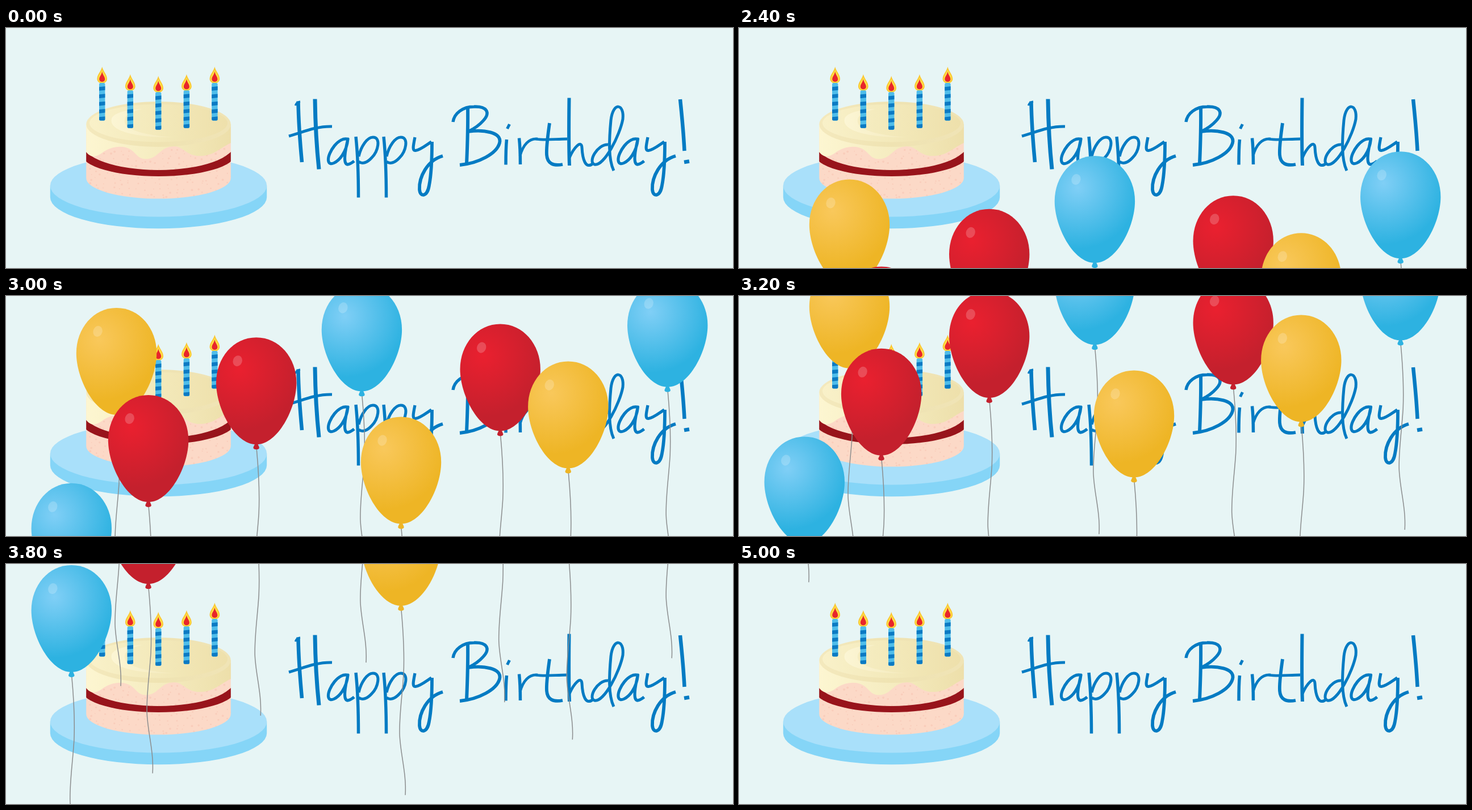
Write an HTML page with a canvas that moves like this. It is 1280x424 px and loops after 5100 ms.

```html
<!DOCTYPE html>
<html lang="en">
<head>
<meta charset="utf-8">
<title>Happy Birthday!</title>
<style>
  html, body { margin: 0; width: 100%; height: 100%; overflow: hidden; background: #e7f5f5; }
  canvas { display: block; }
</style>
</head>
<body>
<canvas id="stage" width="1280" height="424" aria-label="Happy Birthday!"></canvas>
<script>
const ctx = document.getElementById('stage').getContext('2d');
const LOOP = 5100, STEP = 100, RISE = 41.1;
const TAU = Math.PI * 2;

function fill(path, color, c = ctx) {
  c.fillStyle = color;
  c.fill(path);
}

function ellipse(x, y, rx, ry, angle = 0) {
  const p = new Path2D();
  p.ellipse(x, y, rx, ry, angle, 0, TAU);
  return p;
}

function horizontal(c, x0, x1, ...colors) {
  const g = c.createLinearGradient(x0, 0, x1, 0);
  colors.forEach((color, i) => g.addColorStop(i / (colors.length - 1), color));
  return g;
}

function random(seed) {
  return () => (seed = (seed * 16807) % 2147483647) / 2147483647;
}

// Upright band whose lower and upper edges follow the front of an ellipse.
function frontBand(cx, rx, topY, topRy, bottomY, bottomRy) {
  const p = new Path2D();
  p.ellipse(cx, topY, rx, topRy, 0, Math.PI, 0, true);
  p.ellipse(cx, bottomY, rx, bottomRy, 0, 0, Math.PI);
  p.closePath();
  return p;
}

function drawCake(c) {
  const cx = 268.5, rx = 127.3;

  fill(frontBand(cx, 190.7, 278.5, 0.1, 299, 55.2), '#85d5f7', c);
  fill(ellipse(cx, 278.5, 190.7, 55), '#a9e0fa', c);

  const body = frontBand(cx, rx, 175, 0.1, 265, 36.6);
  fill(body, '#fcd9c7', c);
  c.save();
  c.clip(body);
  const rnd = random(41);
  for (let row = 0; row < 12; row++) {
    for (let x = 142; x < 396; x += 14) {
      const r = 0.9 + rnd() * 1.1;
      fill(ellipse(x + rnd() * 10, 204 + row * 8.5 + rnd() * 7, r, r), '#f9cdbb', c);
    }
  }
  // The filling is wider than the body, so the clip cuts its ends at a slant.
  fill(frontBand(cx, 135, 203, 48, 223, 39), '#98141b', c);
  c.restore();

  const icing = new Path2D(
    'M141.2 170 L141.2 219 C149 230 160 228 170 220 C184 209 207 206 220 215 ' +
    'C229 221 232 231 246 231.5 C267 232 270 211 294 209 C313 208 317 227 343 226 ' +
    'C366 225 374 214 395.8 203 L395.8 170 Z');
  fill(icing, horizontal(c, 141, 396, '#fdf6d1', '#f5ecc0', '#eddfaa'), c);
  fill(ellipse(cx, 170, rx, 40), horizontal(c, 141, 396, '#f4e9bd', '#efe3b2', '#f0e4b6'), c);
  fill(ellipse(cx, 168, 121.5, 33.5), horizontal(c, 147, 390, '#f9f1c9', '#f3e9ba', '#eee0ab'), c);
  fill(new Path2D('M186 160 C180 183 233 194 296 193 C250 190 205 181 209 162 C210 152 224 147 240 143 C209 144 189 151 186 160 Z'),
    horizontal(c, 182, 296, '#fcf6d5', '#f4eabd'), c);

  [[169.2, 97], [218.8, 110.3], [268.2, 113.3], [317.9, 110.3], [367.4, 97]]
    .forEach(([x, y]) => drawCandle(c, x, y));
}

function drawCandle(c, x, y) {
  const length = 66.5, band = length / 10;
  c.save();
  c.translate(x, y);
  fill(new Path2D('M0 -28.5 C2 -20 8.8 -15 8.8 -7 C8.8 -2 4 .8 0 .8 C-4 .8 -8.8 -2 -8.8 -7 C-8.8 -15 -2 -20 0 -28.5 Z'), '#fbc52f', c);
  fill(new Path2D('M0 -24 C2 -18 7 -13 7 -7.5 C7 -3 3.5 -1 0 -1 C-3.5 -1 -7 -3 -7 -7.5 C-7 -13 -2 -18 0 -24 Z'), '#fddf48', c);
  fill(new Path2D('M0 -20 C1 -14 5 -11 5 -6.5 C5 -3.5 2.5 -2 0 -2 C-2.5 -2 -5 -3.5 -5 -6.5 C-5 -11 -1 -14 0 -20 Z'), '#e8252b', c);

  const stick = new Path2D();
  stick.roundRect(-5.2, 0, 10.4, length, 2.5);
  fill(stick, '#4fbdea', c);
  c.clip(stick);
  for (let i = 1; i < 10; i += 2) {
    const top = i * band, end = i === 9 ? length + 3 : top + band;
    fill(new Path2D(`M-6 ${top + 0.6} L6 ${top - 0.6} L6 ${end - 0.6} L-6 ${end + 0.6} Z`), '#0b7ac3', c);
  }
  c.restore();
}

// Pen width and path of each stroke.
const GLYPHS = {
  H: [[3.5, 'M509.5 137 Q511 131 518 130'], [6.5, 'M514.5 129.5 C515 165 518 205 521 237'],
      [7, 'M544 125.5 C544.5 165 547 212 551 249.5'], [5, 'M498 191 C520 185 546 173 574 174']],
  a: [[5.2, 'M39 4 C22 -3 2 28 3.5 41 C5 53 20 44 28 32 C34 23 37 13 38 3 C34 20 28 49 38 48 Q43 47 49 42']],
  p: [[5.5, 'M3 1 C6 30 7.5 75 7.5 108.5'], [5, 'M8 36 C12 18 23 2 33 2 C48 2 42 27 31 38 C23 47 14 50 8 45']],
  y: [[5.2, 'M4 1 C1 16 -1 25 5 24.5 C13 24 25 14 33 9'],
      [5.8, 'M34 9 C34 40 33 66 29 86 C26 106 13 108 12 93 C11 72 25 42 53 34']],
  B: [[6, 'M813 138 C813.5 170 812.5 205 811 240'],
      [5.4, 'M787 166 C789 151 804 139 824 139 C846 138 854 149 840 164 C833 172 824 178 814 183'],
      [5.8, 'M814 183 C840 179 874 184 869 203 C864 222 832 239 799 242']],
  i: [[5.5, 'M881.5 197 C880 212 880 226 880 241.5'], [5, 'M886.5 170 L882.5 178']],
  r: [[5.5, 'M903.5 194.5 C905 208 905.5 226 905.5 241'], [4.8, 'M905 226 C910 207 921 194 936 196']],
  t: [[5.8, 'M957 168 C954 190 951 210 952 224 C953 240 964 244 980 241'], [4.8, 'M932 196 C950 199 967 196 988 196']],
  h: [[6, 'M991.5 123.5 C991 165 990.5 203 992 243'],
      [5, 'M992 229 C1000 211 1013 197 1014 211 C1015 231 1020 251 1034 239']],
  d: [[5, 'M1060 206 C1041 205 1024 237 1036 241 C1053 245 1081 189 1086 161 C1089 134 1069 129 1065 163 C1062 195 1060 231 1070 252']],
  '!': [[6.5, 'M1187 126 C1190 155 1193 186 1194.5 217'], [6.5, 'M1194 237 L1203 235.5']]
};

function drawGreeting(c) {
  const letters = [['H'], ['a', 564, 193], ['p', 613, 191], ['p', 662, 191], ['y', 716, 192], ['B'],
    ['i'], ['r'], ['t'], ['h'], ['d'], ['a', 1074.5, 193], ['y', 1126, 192], ['!']];
  c.strokeStyle = '#047bc3';
  c.lineJoin = 'round';
  for (const [name, x = 0, y = 0] of letters) {
    c.save();
    c.translate(x, y);
    for (const [width, path] of GLYPHS[name]) {
      c.lineWidth = width;
      c.stroke(new Path2D(path));
    }
    c.restore();
  }
}

const SKINS = {
  yellow: ['#f9c85b', '#eeb525'],
  red: ['#ea202f', '#c4202d'],
  blue: ['#80cff6', '#2db2e1']
};

// Centre x, top y at 2400 ms, colour; painted back to front.
const BALLOONS = [
  [194.5, 267.5, 'yellow'], [440.7, 319.8, 'red'], [626.4, 226, 'blue'],
  [870.2, 296.2, 'red'], [989.8, 362.2, 'yellow'], [1164.7, 218.3, 'blue'],
  [250.6, 421.6, 'red'], [695.5, 460.2, 'yellow'], [115.3, 577.4, 'blue']
];

const SHELL = new Path2D('M0 0 C40 0 70.7 35.5 70.7 80 C70.7 125 38 189 0 189 C-38 189 -70.7 125 -70.7 80 C-70.7 35.5 -40 0 0 0 Z');
const KNOT = new Path2D('M-2.5 187 C-3 191 -6 193 -5 196 C-3 198.5 3 198.5 5 196 C6 193 3 191 2.5 187 Z');
const STRING = new Path2D('M.5 197 C4 235 6 275 4.5 310 C2 350 -3 380 -2.5 415 C-1.5 450 10 485 7.5 523.5');
const SHINE = ellipse(-33, 41.5, 8, 9.7, 0.35);

function drawBalloon(x, y, [light, dark]) {
  ctx.save();
  ctx.translate(x, y);
  ctx.strokeStyle = '#8b8d8e';
  ctx.lineWidth = 1.5;
  ctx.stroke(STRING);
  fill(KNOT, dark);
  const glow = ctx.createRadialGradient(-30, 56, 0, -30, 56, 108);
  glow.addColorStop(0, light);
  glow.addColorStop(1, dark);
  fill(SHELL, glow);
  fill(SHINE, 'rgba(255,255,255,.2)');
  ctx.restore();
}

const scene = document.createElement('canvas');
scene.width = 1280;
scene.height = 424;
const sceneCtx = scene.getContext('2d');
sceneCtx.fillStyle = '#e7f5f5';
sceneCtx.fillRect(0, 0, 1280, 424);
drawCake(sceneCtx);
drawGreeting(sceneCtx);

const start = performance.now();

function render() {
  const step = Math.floor(((performance.now() - start) % LOOP) / STEP);
  ctx.drawImage(scene, 0, 0);
  for (const [x, top, skin] of BALLOONS) {
    const y = top - (step - 24) * RISE;
    if (y < 424 && y > -530) drawBalloon(x, y, SKINS[skin]);
  }
  requestAnimationFrame(render);
}
render();
</script>
</body>
</html>
```
